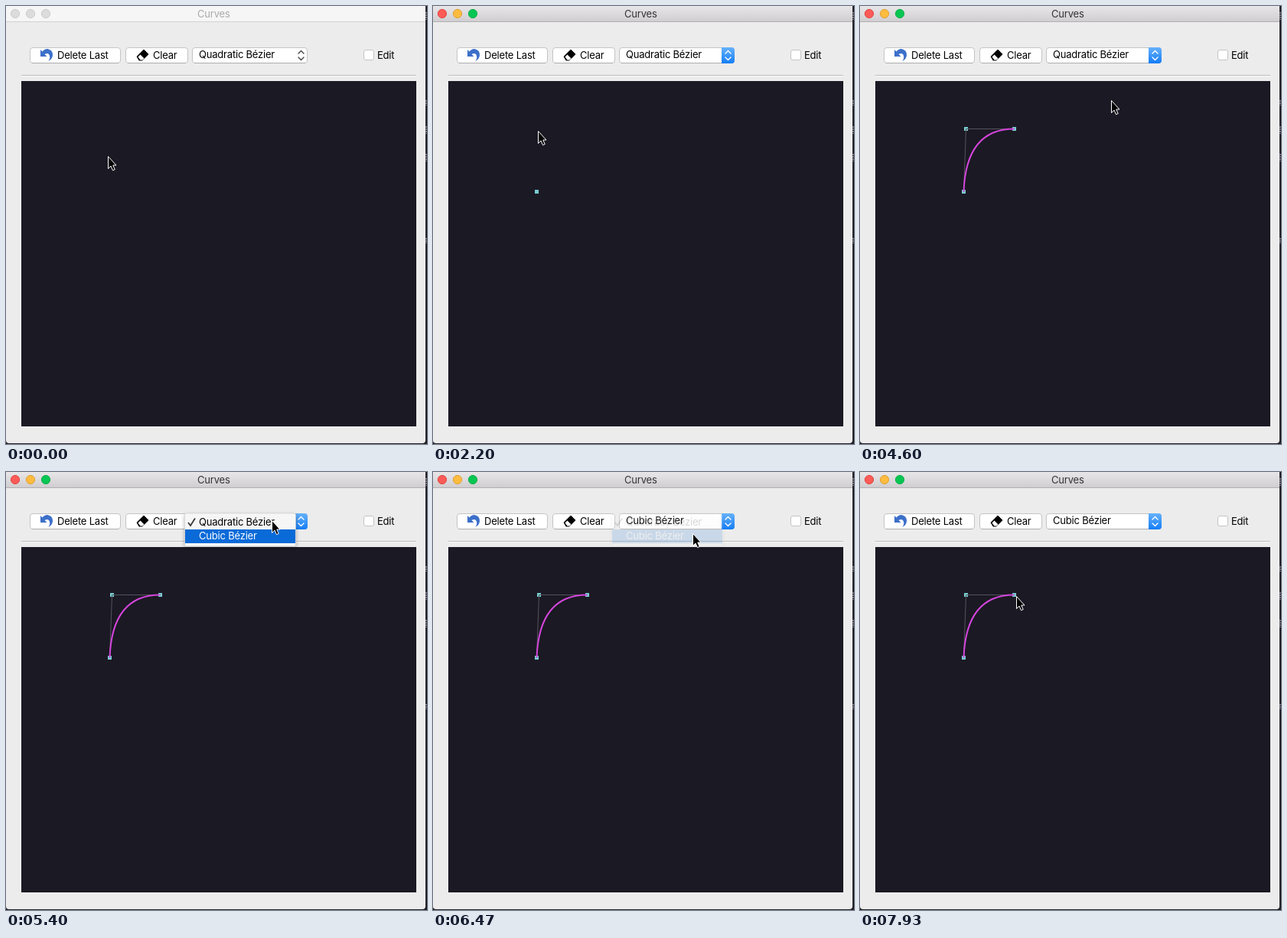
Animation of 550x572 px, one loop 8000 ms. Source, as an HTML page:

```html
<!DOCTYPE html>
<html lang="en">
<head>
<meta charset="utf-8">
<title>Curves</title>
<style>
  html, body { margin: 0; width: 100%; height: 100%; overflow: hidden; background: #1b1924; }
  svg { display: block; width: 550px; height: 572px; }
  text { font: 13px Inter, Roboto, sans-serif; letter-spacing: -.2px; fill: #000; white-space: pre; }
  .control { fill: #fff; stroke: #c4c4c4; }
  .chevrons { fill: none; stroke-width: 1.4; stroke-linecap: round; stroke-linejoin: round; }
</style>
</head>
<body>
<svg viewBox="0 0 550 572">
  <defs>
    <linearGradient id="titleFill" x2="0" y2="1">
      <stop stop-color="#e8e6e8"/><stop offset="1" stop-color="#d0ced0"/>
    </linearGradient>
    <linearGradient id="blueFill" x2="0" y2="1">
      <stop stop-color="#66b1fa"/><stop offset="1" stop-color="#147df6"/>
    </linearGradient>
    <filter id="shadow" x="-10%" y="-20%" width="120%" height="150%">
      <feDropShadow dx="0" dy="2" stdDeviation="2.5" flood-opacity=".3"/>
    </filter>
    <path id="chevronPair" class="chevrons" d="M382 62l3.5-3.5 3.5 3.5M382 67l3.5 3.5 3.5-3.5"/>
  </defs>

  <!-- Window behind -->
  <rect width="550" height="572" fill="#222027"/>
  <path d="M549 8v10M549 123v7M549 157v10M549 193v10M549 303v7" stroke="#77717f" stroke-width="2" stroke-dasharray="2 1"/>

  <!-- Window -->
  <path d="M0 0H548V567q0 4-4 4H4q-4 0-4-4Z" fill="#ececec"/>
  <rect id="titleBar" width="548" height="20"/>
  <rect id="titleLine" y="20" width="548" height="1"/>
  <g id="lights"><circle cx="12" cy="10" r="5.6"/><circle cx="32" cy="10" r="5.6"/><circle cx="52" cy="10" r="5.6"/></g>
  <text id="title" x="250" y="15">Curves</text>

  <!-- Toolbar -->
  <g class="control">
    <rect x="31.5" y="54.5" width="118" height="20" rx="3.5"/>
    <rect x="156.5" y="54.5" width="81" height="20" rx="3.5"/>
    <rect x="243.5" y="54.5" width="150" height="20" rx="3.5"/>
    <rect x="467.5" y="57.5" width="13" height="13" rx="2.5"/>
  </g>
  <path d="M34 74.5H147M159 74.5H235M246 74.5H391" stroke="#adadad"/>
  <path d="M45 57v9h8.5l-3-3q5-3 6.5 2 1 4-2 7 6-3 6-8 0-7-7-8-4 0-6.500 3.500z" fill="#3c6fc9"/>
  <path d="M171 66l9-9 6 6-8 8h-4z" fill="#000" stroke="#000" stroke-linejoin="round"/>
  <path d="M172.500 66.500l3-3 5 5-2 2h-3z" fill="#fff"/>
  <text x="67" y="69">Delete Last</text>
  <text x="192" y="69">Clear</text>
  <text id="choice" x="252" y="68"></text>
  <text x="485" y="69">Edit</text>
  <path id="blueEnd" d="M377 54h13q4 0 4 4v13q0 4-4 4h-13z" fill="url(#blueFill)"/>
  <use id="chevrons" href="#chevronPair"/>
  <path d="M20 90.500H536" stroke="#bdbdbd"/>
  <path d="M20 91.500H536" stroke="#f8f8f8"/>

  <!-- Drawing area -->
  <rect x="20" y="98" width="516" height="451" fill="#1b1924"/>
  <g id="points" fill="#78cdd0"></g>
  <g id="curve" fill="none">
    <path d="M135.500 242.500L138.500 160.500H201.500" stroke="#55535c"/>
    <path d="M135.500 242.500Q138.500 160.500 201.500 160.500" stroke="#d546dd" stroke-width="2"/>
  </g>

  <!-- Drop-down list -->
  <g id="menu">
    <rect x="233.500" y="54" width="145" height="43" rx="2" fill="#f6f6f6" stroke="#c9c9c9" stroke-width=".6" filter="url(#shadow)"/>
    <rect x="234" y="75" width="144" height="18" fill="#0a6ad8"/>
    <path d="M238 66l3 4 6-9.500" fill="none" stroke="#333" stroke-width="1.700"/>
    <text x="252" y="70">Quadratic Bézier</text>
    <text x="252" y="88" style="fill:#fff">Cubic Bézier</text>
  </g>

  <!-- Pointer shapes, with the hot spot at 0,0 -->
  <path id="arrow" d="M.5 .5V16.500L4 13l2.500 5.700 2.700-1.200L6.800 12H11Z" fill="#000" stroke="#fff" stroke-linejoin="round"/>
  <g id="hand" fill="none" stroke-linecap="round" stroke-linejoin="round">
    <path d="M-4-4l2 6M-1-6l.5 7M2-6l-.3 7M5-3.500L3.500 2M-6 1l4 4" stroke="#fff" stroke-width="2"/>
    <path d="M-3 1h7l-.8 5h-4.500z" fill="#fff" stroke="#fff"/>
    <path d="M-.5 2v3M1.500 2v3" stroke="#44424c" stroke-width=".7"/>
  </g>
</svg>

<script>
const $ = id => document.getElementById(id);
const LOOP = 8000;
const ACTIVATE = 1200, MENU_OPEN = 5400, CHOOSE = 6250, FADE = 260;

// Control points: x, y, time placed
const points = [[135, 242, 1200], [138, 160, 2670], [201, 160, 3930]];
const squares = points.map(([x, y]) => {
  const square = document.createElementNS('http://www.w3.org/2000/svg', 'rect');
  for (const [name, value] of Object.entries({ x: x - 2, y: y - 2, width: 5, height: 5 }))
    square.setAttribute(name, value);
  return $('points').appendChild(square);
});

// Pointer path: time, x, y
const path = [
  [0, 133, 196], [70, 133, 197], [400, 135, 242], [1600, 135, 242],
  [2200, 137, 163], [2400, 137, 159], [2670, 138, 160], [2900, 138, 160],
  [3400, 199, 158], [3670, 200, 159], [4100, 201, 160], [4600, 328, 123],
  [4800, 331, 116], [5300, 347, 62], [5500, 347, 63], [5870, 344, 75],
  [6100, 341, 79], [6530, 339, 80], [7330, 199, 160], [7400, 199, 161],
  [7530, 203, 160], [7670, 203, 161], [7930, 204, 162], [LOOP, 204, 162]
];
const handTimes = [[600, 1600], [2670, 2900], [3930, 4100]];

function pointerAt(t) {
  const i = path.findIndex(([time]) => time > t);
  const [t0, x0, y0] = path[i - 1], [t1, x1, y1] = path[i];
  const u = (t - t0) / (t1 - t0), ease = u * u * (3 - 2 * u);
  return [Math.round(x0 + (x1 - x0) * ease), Math.round(y0 + (y1 - y0) * ease)];
}

const show = (element, visible) => element.style.display = visible ? '' : 'none';

function paintWindow(active) {
  $('titleBar').style.fill = active ? 'url(#titleFill)' : '#f6f6f6';
  $('titleLine').style.fill = active ? '#b1afb1' : '#d2d2d2';
  $('title').style.fill = active ? '#333' : '#aaa';
  const colors = [['#fc5b57', '#e2443f'], ['#fdbc40', '#dfa033'], ['#08c653', '#08ad45']];
  [...$('lights').children].forEach((light, i) => {
    [light.style.fill, light.style.stroke] = active ? colors[i] : ['#dcdcdc', '#cbcbcb'];
  });
  show($('blueEnd'), active);
  $('chevrons').style.stroke = active ? '#fff' : '#444';
}

function draw() {
  const t = performance.now() % LOOP;
  paintWindow(t >= ACTIVATE);
  squares.forEach((square, i) => show(square, t >= points[i][2]));
  show($('curve'), t >= points[2][2]);

  $('choice').textContent = t < CHOOSE ? 'Quadratic Bézier' : 'Cubic Bézier';
  show($('menu'), t >= MENU_OPEN && t < CHOOSE + FADE);
  $('menu').style.opacity = Math.min(1, Math.max(0, 1 - (t - CHOOSE) / FADE));

  const isHand = handTimes.some(([from, to]) => t >= from && t < to);
  for (const id of ['arrow', 'hand']) {
    $(id).setAttribute('transform', `translate(${pointerAt(t)})`);
    show($(id), isHand === (id === 'hand'));
  }
  requestAnimationFrame(draw);
}
draw();
</script>
</body>
</html>
```
